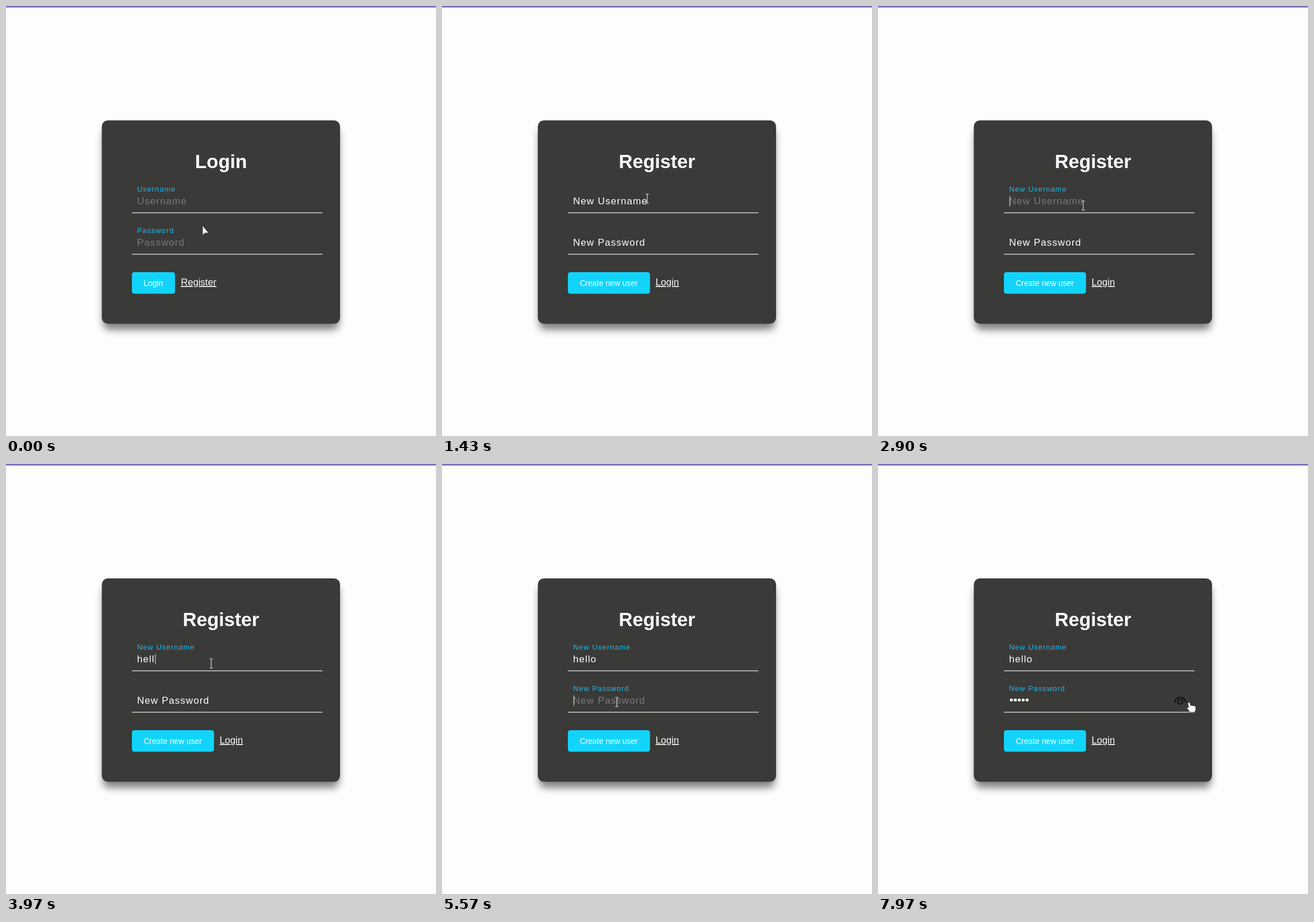
Write an HTML page that moves like this. It is 748 px wide and 748 px high and loops after 8000 ms.

```html
<!DOCTYPE html>
<html lang="en">
<head>
<meta charset="utf-8">
<title>Login and register form</title>
<style>
  html, body { margin: 0; width: 100%; height: 100%; overflow: hidden; background: #fdfdfc; }
  svg { display: block; width: 100vw; height: 100vh; }
  text { font-family: "Liberation Sans", Arial, sans-serif; fill: #fff; white-space: pre; }
  .title { font-size: 33.2px; font-weight: bold; text-anchor: middle; }
  .field { font-size: 17px; letter-spacing: 1.04px; }
  .hint { fill: #797978; }
  .button { font-size: 13.8px; }
  .link { font-size: 16.6px; text-decoration: underline; }
</style>
</head>
<body>
<svg viewBox="0 0 748 748">
  <defs>
    <filter id="blur" x="-10%" y="-10%" width="120%" height="120%">
      <feGaussianBlur stdDeviation="7"/>
    </filter>
  </defs>
  <rect width="748" height="748" fill="#fdfdfc"/>
  <rect width="748" height="2.6" fill="#746db7"/>
  <rect x="169" y="213" width="410" height="350" rx="10" opacity=".5" filter="url(#blur)"/>
  <rect x="166.7" y="199" width="414.4" height="353.8" rx="10.5" fill="#3a3a38"/>
  <text id="title" class="title" x="374" y="281.5"></text>
  <g id="fields"></g>
  <rect id="button" x="219" y="463" height="37.6" rx="4.5" fill="#12d4fa"/>
  <text id="action" class="button" x="239.4" y="486.5"></text>
  <text id="link" class="link" y="486"></text>
  <g id="dots" fill="#fff"></g>
  <g id="eye" fill="none" stroke="#0a0a0a" stroke-width="1.9" stroke-linecap="round">
    <path d="M516 414.5C519.5 403 532 403 535.6 414.5"/>
    <circle cx="525.8" cy="413.4" r="4.2"/>
  </g>
  <rect id="caret" width="1" height="18" fill="#e4e4e4"/>
  <g id="cursor">
    <path id="arrow" d="M0 0V16.6L4 12.8H10.4Z" fill="#fff" stroke="#262626" stroke-width=".6"/>
    <path id="beam" d="M-3 -8H-1Q0 -8 0 -7Q0 -8 1 -8H3M0 -7V7M-3 8H-1Q0 8 0 7Q0 8 1 8H3"
      fill="none" stroke="#d6d6d6" stroke-width="1.2"/>
    <path id="hand" d="M-1.8 1.2Q-1.6 -.4 0 -.3Q1.5 -.2 1.8 1.4L2.6 5.4Q4.4 4.4 5.6 5.6Q7 4.7 8.3 6Q11.2 5.2 11.6 8.2V12.5L10 16.4H1.6L-3 10.4Q-3.6 8.4 -1.8 8.2L-.4 8.8Z"
      fill="#fff" stroke="#262626" stroke-width=".5"/>
  </g>
</svg>
<script>
const LOOP = 8000, SWAP = 930, FADE = 300, BLINK = 500;
const FOCUS_USER = 1890, FOCUS_PASS = 5110;
const USER_KEYS = [3610, 3730, 3850, 3950, 4070];
const PASS_KEYS = [5680, 5780, 5880, 5970, 6080];
const WORD = 'hello';
// time, x, y
const PATH = [
  [0, 342, 382], [150, 342, 383], [650, 336, 478], [980, 336, 478],
  [1400, 357, 335], [1500, 357, 335], [1720, 357, 347], [4450, 357, 347],
  [4950, 304, 414], [7280, 304, 414], [7850, 541, 415], [LOOP, 541, 415]
];

const $ = id => document.getElementById(id);
const clamp = v => Math.max(0, Math.min(1, v));
const mix = (a, b, p) => a + (b - a) * p;
const smooth = p => p * p * (3 - 2 * p);
const easeOut = p => 1 - (1 - p) ** 2.4;
const count = (keys, t) => keys.filter(k => k <= t).length;
const show = (el, on) => el.setAttribute('visibility', on ? 'visible' : 'hidden');

function set(el, attrs) {
  for (const key in attrs) el.setAttribute(key, attrs[key]);
  return el;
}

function add(parent, tag, attrs) {
  const el = document.createElementNS('http://www.w3.org/2000/svg', tag);
  return parent.appendChild(set(el, attrs));
}

function makeField(y) {
  const g = $('fields');
  add(g, 'rect', { x: 219, y: y + 14, width: 331.5, height: 1.4, fill: '#d4d4d3' });
  const text = cls => add(g, 'text', { class: cls, x: 228, y });
  return { y, hint: text('field hint'), value: text('field'), label: text('field') };
}

const user = makeField(345), pass = makeField(417);
const dots = WORD.split('').map((_, i) =>
  add($('dots'), 'circle', { cx: 232 + i * 6.85, cy: 410.5, r: 2.6 }));

function drawField(field, name, lift, value, filled) {
  const { y, hint, label } = field;
  hint.textContent = label.textContent = name;
  field.value.textContent = value;
  show(hint, lift > 0 && !filled);
  label.setAttribute('y', mix(y, y - 22, lift));
  label.style.fontSize = mix(17, 12.75, lift) + 'px';
  label.style.fill = `rgb(${mix(255, 28, lift)},${mix(255, 184, lift)},${mix(255, 236, lift)})`;
}

function drawCaret(t, typed, hidden) {
  const inPass = t >= FOCUS_PASS;
  const start = inPass ? FOCUS_PASS : FOCUS_USER;
  const keys = inPass ? PASS_KEYS : USER_KEYS;
  const last = Math.max(start, ...keys.filter(k => k <= t));
  const offset = inPass ? hidden * 6.85 : typed ? user.value.getComputedTextLength() : 0;
  set($('caret'), { x: 228.8 + offset, y: inPass ? 402.5 : 330.5 });
  show($('caret'), t >= FOCUS_USER && Math.floor((t - last) / BLINK) % 2 === 0);
}

function drawCursor(t, register, eye) {
  const i = PATH.findIndex(p => p[0] > t);
  const [t0, x0, y0] = PATH[i - 1], [t1, x1, y1] = PATH[i];
  const p = smooth((t - t0) / (t1 - t0));
  const x = mix(x0, x1, p), y = mix(y0, y1, p);
  const overInput = (y > 324 && y < 360) || (y > 397 && y < 432);
  const overAction = y > 463 && y < 500 && x > 219 && x < (register ? 362 : 367);
  const kind = overAction || (eye && x > 512) ? 'hand' : overInput ? 'beam' : 'arrow';
  for (const id of ['arrow', 'beam', 'hand']) show($(id), id === kind);
  $('cursor').setAttribute('transform', `translate(${x} ${y})`);
}

function draw(t) {
  const register = t >= SWAP;
  const typed = count(USER_KEYS, t), hidden = count(PASS_KEYS, t);
  const lift = start => register ? easeOut(clamp((t - start) / FADE)) : 1;
  const prefix = register ? 'New ' : '';

  $('title').textContent = register ? 'Register' : 'Login';
  $('action').textContent = register ? 'Create new user' : 'Login';
  $('link').textContent = register ? 'Login' : 'Register';
  $('link').setAttribute('x', register ? 371.6 : 304.2);
  $('button').setAttribute('width', register ? 142.8 : 75);

  drawField(user, prefix + 'Username', lift(FOCUS_USER), WORD.slice(0, typed), typed > 0);
  drawField(pass, prefix + 'Password', lift(FOCUS_PASS), '', hidden > 0);
  dots.forEach((dot, i) => show(dot, i < hidden));
  show($('eye'), hidden > 0);
  drawCaret(t, typed, hidden);
  drawCursor(t, register, hidden > 0);
}

const origin = performance.now();
function tick() {
  draw((performance.now() - origin) % LOOP);
  requestAnimationFrame(tick);
}
tick();
</script>
</body>
</html>
```
